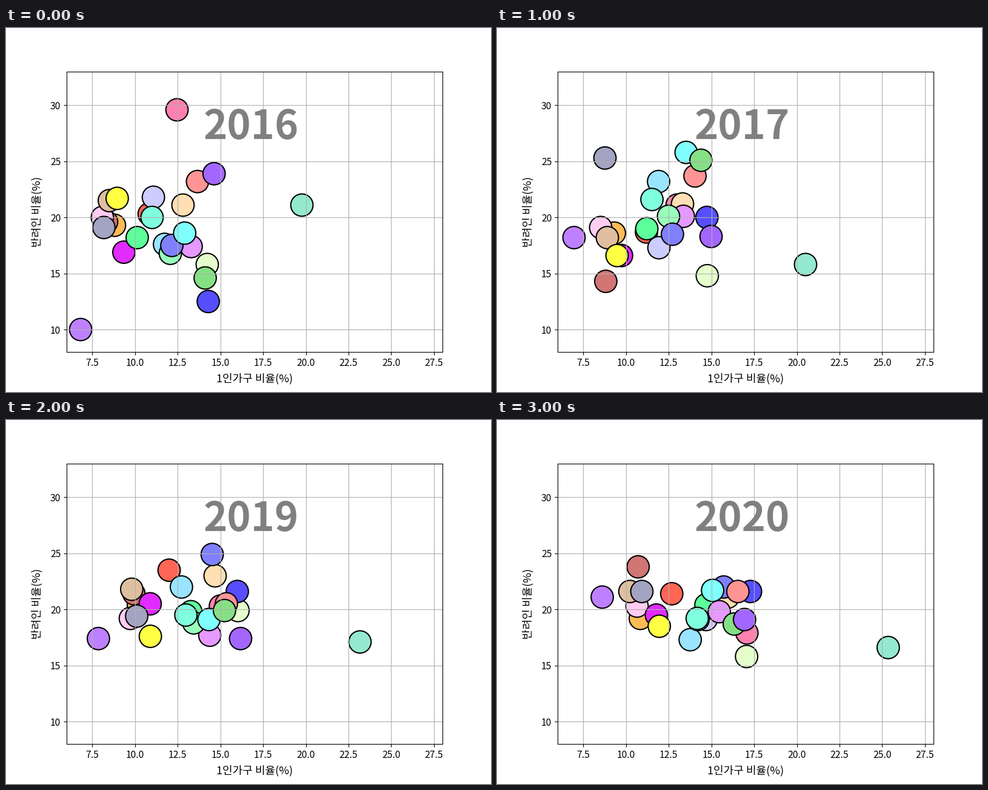
A matplotlib script that plays this animation: 800x600 px, repeating every 4 s.

```python
import matplotlib.pyplot as plt
import numpy as np
from matplotlib.animation import FuncAnimation

plt.rcParams["font.family"] = ["Noto Sans CJK JP", "DejaVu Sans"]

YEARS = [2016, 2017, 2019, 2020]

# One colour per district, in drawing order
COLORS = """
#E5FFCC #574FFF #FF6655 #CCCCFF #FFBB55 #D17575 #FF80B0 #FFDFB3 #FFCCF2
#99E5FF #E12BFF #5CFF99 #E599FF #99FFBB #DFBF9F #FFFF44 #A3A3C2 #80FFDF
#8080FF #80FFFF #FF9494 #85E085 #A366FF #94E9CF #BF80FF
""".split()

# Share of one-person households (%)
SINGLE = {
    2016: [14.23, 14.29, 10.83, 11.08, 8.80, 8.34, 12.46, 12.81, 8.09,
           11.73, 9.35, 10.13, 13.29, 12.07, 8.50, 8.96, 8.18, 11.00,
           12.16, 12.91, 13.66, 14.11, 14.63, 19.77, 6.82],
    2017: [14.76, 14.74, 11.20, 11.93, 9.32, 8.82, 12.99, 13.31, 8.52,
           11.91, 9.74, 11.22, 13.36, 12.49, 8.91, 9.48, 8.77, 11.52,
           12.72, 13.52, 14.04, 14.39, 14.98, 20.51, 6.96],
    2019: [16.03, 15.99, 12.00, 13.20, 10.20, 9.94, 15.00, 14.69, 9.73,
           12.72, 10.89, 13.27, 14.38, 13.44, 9.81, 10.90, 10.10, 12.98,
           14.52, 14.33, 15.35, 15.24, 16.18, 23.17, 7.86],
    2020: [17.06, 17.29, 12.68, 14.69, 10.84, 10.71, 17.08, 15.97, 10.65,
           13.76, 11.78, 14.68, 15.46, 14.22, 10.23, 11.95, 10.93, 14.17,
           15.72, 15.07, 16.55, 16.34, 16.94, 25.35, 8.61],
}

# Share of pet owners (%)
PETS = {
    2016: [15.8, 12.5, 20.3, 21.8, 19.3, 19.6, 29.6, 21.1, 20.0,
           17.6, 16.9, 18.2, 17.4, 16.8, 21.5, 21.7, 19.1, 20.0,
           17.5, 18.6, 23.2, 14.6, 23.9, 21.1, 10.0],
    2017: [14.8, 20.0, 18.7, 17.3, 18.6, 14.3, 21.1, 21.2, 19.1,
           23.2, 16.6, 19.0, 20.1, 20.1, 18.2, 16.6, 25.3, 21.6,
           18.5, 25.8, 23.7, 25.1, 18.3, 15.8, 18.2],
    2019: [19.9, 21.6, 23.5, 19.3, 20.4, 21.4, 20.3, 23.0, 19.2,
           22.0, 20.5, 19.8, 17.7, 18.8, 21.8, 17.6, 19.4, 19.5,
           24.9, 19.1, 20.5, 19.9, 17.4, 17.1, 17.4],
    2020: [15.8, 21.6, 21.4, 19.1, 19.2, 23.8, 17.9, 21.1, 20.3,
           17.3, 19.5, 20.4, 19.8, 19.1, 21.6, 18.5, 21.6, 19.2,
           22.0, 21.7, 21.6, 18.7, 19.1, 16.6, 21.1],
}

fig, ax = plt.subplots(figsize=(8, 6), dpi=100)
ax.set(xlim=(6, 28), ylim=(8, 33),
       xticks=np.arange(7.5, 28, 2.5), yticks=range(10, 31, 5))
ax.grid(True)
ax.tick_params(labelsize=11.3)

ax.set_xlabel("1인가구 비율(%)", fontsize=13, va="center")
ax.set_ylabel("반려인 비율(%)", fontsize=13, va="center")
ax.xaxis.set_label_coords(0.5, -44 / 462)
ax.yaxis.set_label_coords(-49 / 620, 0.5)

bubbles = ax.scatter(SINGLE[2016], PETS[2016], s=700, c=COLORS,
                     edgecolors="black", linewidths=1.5)
year_label = ax.text(14, 27, "", fontsize=48, weight="bold", color="gray")


def update(frame):
    year = YEARS[frame]
    bubbles.set_offsets(np.column_stack([SINGLE[year], PETS[year]]))
    year_label.set_text(str(year))
    return bubbles, year_label


anim = FuncAnimation(fig, update, frames=len(YEARS), interval=1000,
                     repeat=True, repeat_delay=0)
plt.show()
```
